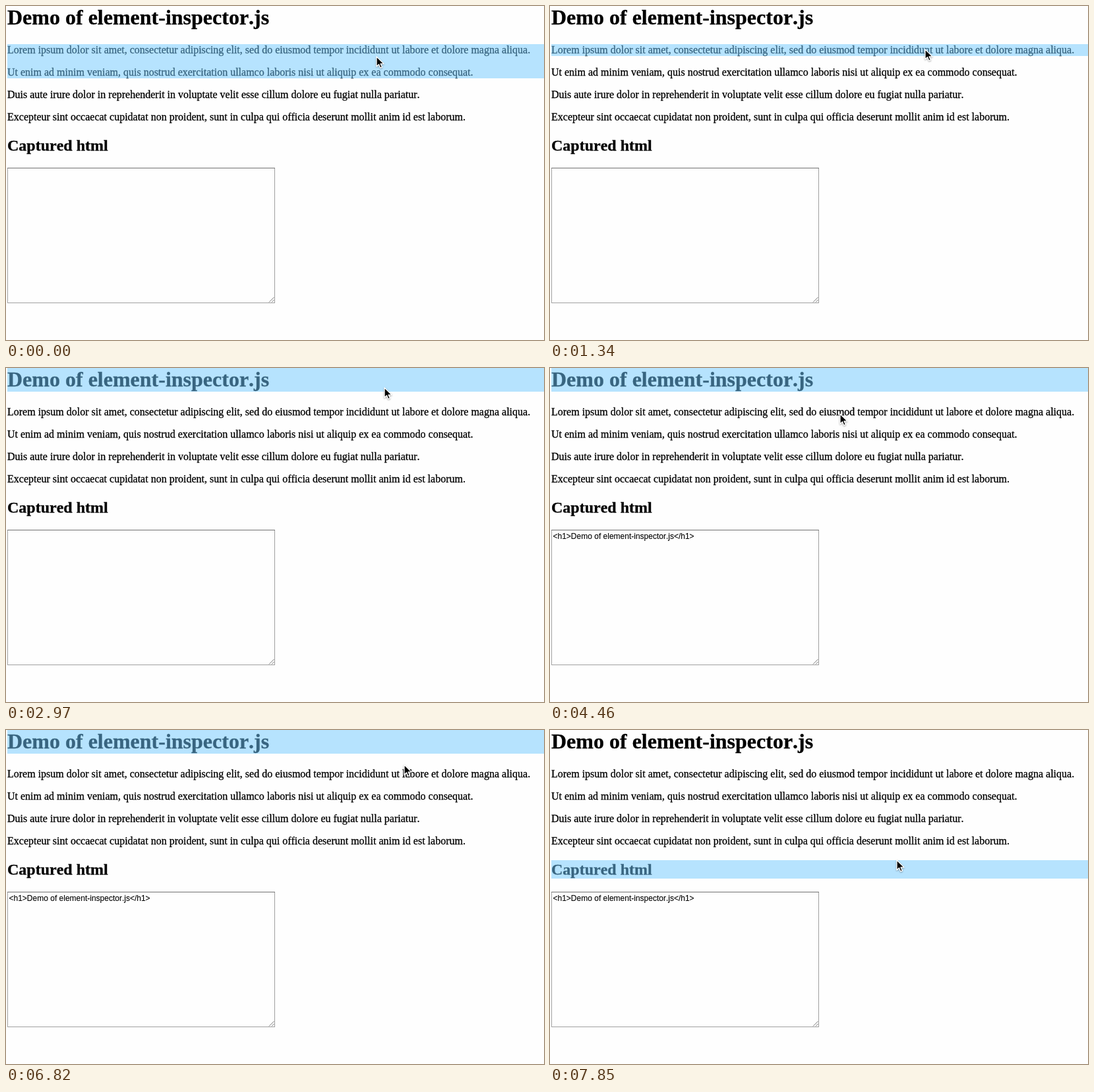
An HTML page for the animation above (8000 ms loop, 816x508 px).

```html
<!DOCTYPE html>
<html lang="en">
<head>
<meta charset="utf-8">
<title>Element inspector demo</title>
<style>
  html, body { margin: 0; width: 100%; height: 100%; overflow: hidden; background: #fefefe; }
  svg { display: block; width: 816px; height: 508px; }
  text { font-family: "Liberation Serif", Times, serif; font-kerning: none; stroke: #000; stroke-width: .3px; }
  .heading { font-weight: bold; }
  #code { font-family: "Liberation Sans", Helvetica, sans-serif; font-size: 12px; stroke-width: .1px; }
  #mark { fill: rgb(113, 201, 255); fill-opacity: .5; }
  #cursor { filter: drop-shadow(0 1px 1px rgba(0, 0, 0, .35)); }
</style>
</head>
<body>
<svg viewBox="0 0 816 508">
  <rect width="816" height="508" fill="#fefefe"/>
  <g id="page"></g>
  <g fill="none">
    <rect x="2.5" y="246.5" width="405" height="205" stroke="#a0a0a0"/>
    <path d="M2 246.5H408" stroke="#707070"/>
    <path d="M399 450.5L406.5 443M403 450.5L406.5 447" stroke="#777"/>
  </g>
  <text id="code" x="4.5" y="260">&lt;h1&gt;Demo of element-inspector.js&lt;/h1&gt;</text>
  <rect id="mark" x="2" width="814"/>
  <path id="cursor" d="M0 0V15L3.5 11.8L5.8 17.2L8.4 16.1L6.1 10.9H11Z" stroke="#fff" stroke-width="1.3" stroke-linejoin="round"/>
</svg>
<script>
const LOOP = 8000, BEAT = 148, CAPTURE = 23, RESUME = 41;
const byId = id => document.getElementById(id);
const mark = byId('mark'), cursor = byId('cursor'), code = byId('code');

const paragraphs = [
  'Lorem ipsum dolor sit amet, consectetur adipiscing elit, sed do eiusmod tempor incididunt ut labore et dolore magna aliqua.',
  'Ut enim ad minim veniam, quis nostrud exercitation ullamco laboris nisi ut aliquip ex ea commodo consequat.',
  'Duis aute irure dolor in reprehenderit in voluptate velit esse cillum dolore eu fugiat nulla pariatur.',
  'Excepteur sint occaecat cupidatat non proident, sunt in culpa qui officia deserunt mollit anim id est laborum.'
];

// Adds a line of text to the page and returns the box of its element.
function addLine(text, top, size) {
  const line = document.createElementNS('http://www.w3.org/2000/svg', 'text');
  line.textContent = text;
  line.setAttribute('x', 2);
  line.setAttribute('y', top + Math.round(size * .9));
  line.setAttribute('font-size', size);
  if (size > 16) line.setAttribute('class', 'heading');
  byId('page').append(line);
  return { top, bottom: top + Math.round(size * 1.15) };
}

const boxes = [
  addLine('Demo of element-inspector.js', -1, 32),
  ...paragraphs.map((text, i) => addLine(text, 58 + 34 * i, 16)),
  addLine('Captured html', 198, 24)
];
const wrapper = { top: boxes[1].top, bottom: boxes[2].bottom };
boxes.push(wrapper);

// Pointer key points: beat, x, y.
const path = [
  [0, 562, 77], [2, 568, 24], [5, 555, 197], [8, 571, 47], [9, 569, 66],
  [15, 560, 131], [16, 564, 96], [20, 574, 30], [21, 576, 22], [22, 576, 22],
  [24, 581, 15], [29, 581, 15], [33, 15, 236], [36, 764, 14], [37, 620, 31],
  [40, 620, 31], [41, 628, 26], [45, 628, 26], [49, 533, 134], [52, 525, 239], [53, 526, 198]
];

function pointerAt(beat) {
  const next = Math.max(1, path.findIndex(([b]) => b >= beat));
  const [b0, x0, y0] = path[next - 1], [b1, x1, y1] = path[next];
  const k = (beat - b0) / (b1 - b0);
  return { x: Math.round(x0 + (x1 - x0) * k), y: Math.round(y0 + (y1 - y0) * k) };
}

// The marked element stays while the pointer is in a gap or the capture is shown.
let box = wrapper;
const lastBeat = path[path.length - 1][0];
const steps = Array.from({ length: lastBeat + 1 }, (_, beat) => {
  const { x, y } = pointerAt(beat);
  if (beat < CAPTURE || beat >= RESUME) box = boxes.find(b => y >= b.top && y < b.bottom) || box;
  return { x, y, box };
});

function draw(t) {
  const beat = Math.min(lastBeat, Math.floor(t / BEAT));
  const { x, y, box } = steps[beat];
  cursor.setAttribute('transform', `translate(${x} ${y})`);
  mark.setAttribute('y', box.top);
  mark.setAttribute('height', box.bottom - box.top);
  code.setAttribute('visibility', beat >= CAPTURE ? 'visible' : 'hidden');
}

const start = performance.now();
function tick() {
  draw((performance.now() - start) % LOOP);
  requestAnimationFrame(tick);
}
tick();
</script>
</body>
</html>
```
